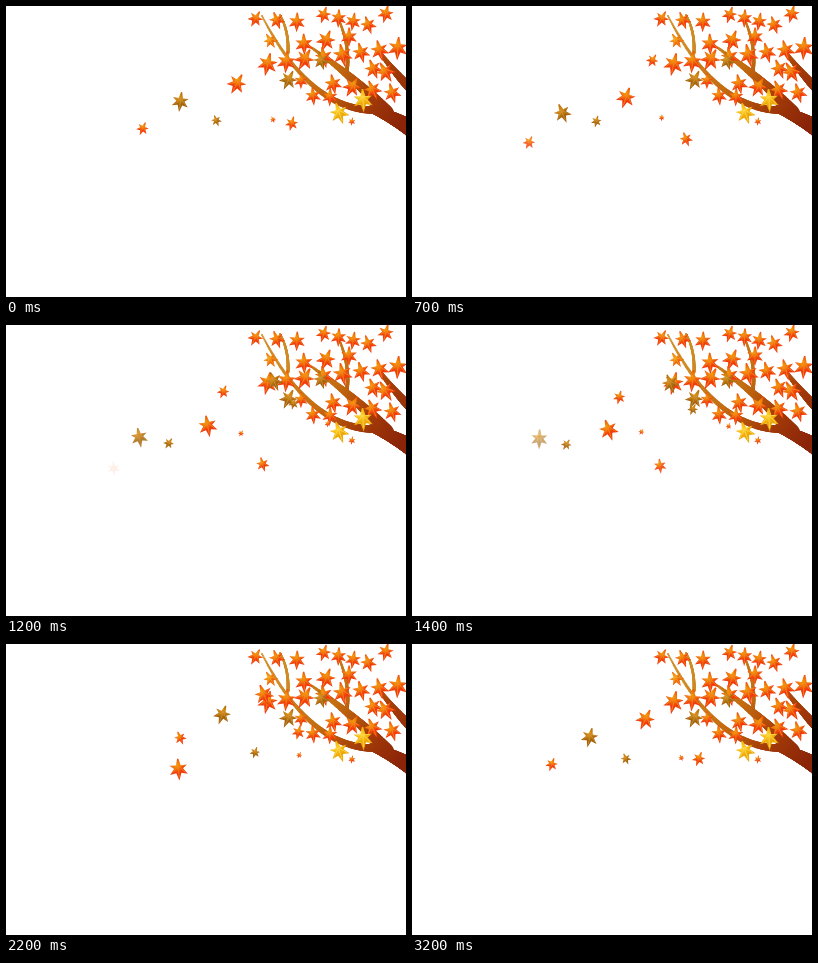
An HTML page with a canvas for the animation above (3300 ms loop, 400x291 px).

```html
<!DOCTYPE html>
<html lang="en">
<head>
<meta charset="utf-8">
<title>Autumn branch</title>
<style>
html, body { margin: 0; width: 100%; height: 100%; overflow: hidden; background: #fff; }
canvas { display: block; width: 400px; height: 291px; }
</style>
</head>
<body>
<canvas id="stage" width="400" height="291"></canvas>
<script>
const ctx = document.getElementById('stage').getContext('2d');
const LOOP = 3300, STEP = 100, FADE = 650, RAD = Math.PI / 180;
const mix = (a, b, p) => a + (b - a) * p;

let seed = 7;
const random = () => (seed = seed * 16807 % 2147483647) / 2147483647;

// Maple leaf, tip up: lobes and notches alternate around the centre, shrinking to the stem.
const leafPath = new Path2D(), veins = new Path2D();
for (let i = -5; i <= 5; i++) {
  const n = Math.abs(i), lobe = n % 2 === 0;
  const r = lobe ? 1.15 - n * .08 : .56 - n * .05;
  const x = r * Math.sin(i * 27 * RAD), y = -r * Math.cos(i * 27 * RAD);
  leafPath.lineTo(x, y);
  if (lobe) {
    veins.moveTo(0, .2);
    veins.lineTo(x * .75, y * .75);
  }
}
leafPath.lineTo(.06, .85);
leafPath.lineTo(-.06, .85);
leafPath.closePath();

const palette = {
  red: ['#f29a08', '#f03c0c', '#f58a1c'],
  orange: ['#f5a410', '#ec6408', '#f7a830'],
  brown: ['#dc9210', '#a4640c', '#d0903c'],
  yellow: ['#ffce24', '#eca808', '#ffd850']
};

function leaf(x, y, r, deg, tone, alpha = 1) {
  const [core, edge, vein] = palette[tone];
  const fill = ctx.createRadialGradient(.15, .25, .1, .15, .25, .95);
  fill.addColorStop(0, core);
  fill.addColorStop(.7, edge);
  ctx.save();
  ctx.globalAlpha = alpha;
  ctx.translate(x, y);
  ctx.rotate(deg * RAD);
  ctx.scale(r, r);
  ctx.fillStyle = fill;
  ctx.fill(leafPath);
  ctx.strokeStyle = vein;
  ctx.lineWidth = .07;
  ctx.stroke(veins);
  ctx.restore();
}

// Leaves stand evenly along each row, with a random tilt and size.
const leaves = [];
function row(tone, r, count, [x0, y0], [x1, y1] = [x0, y0]) {
  for (let i = 0; i < count; i++) {
    const p = i / Math.max(1, count - 1);
    leaves.push([mix(x0, x1, p), mix(y0, y1, p), r * mix(.92, 1.08, random()),
      180 + mix(-35, 35, random()), tone]);
  }
}
row('red', 9.5, 3, [250, 12], [291, 15]);
row('red', 9, 4, [318, 8], [362, 18]);
row('red', 9.5, 1, [380, 7]);
row('orange', 8, 1, [264, 34]);
row('red', 10.5, 3, [298, 37], [343, 30]);
row('red', 11, 8, [262, 57], [392, 41]);
row('brown', 10, 2, [283, 73], [315, 54]);
row('red', 8, 1, [295, 74]);
row('red', 10.5, 2, [367, 62], [379, 65]);
row('red', 10.5, 4, [327, 77], [386, 86]);
row('red', 9.5, 2, [307, 89], [324, 90]);
row('yellow', 11, 2, [333, 106], [357, 93]);
row('red', 4, 1, [346, 115]);

const bark = ctx.createLinearGradient(396, 118, 285, 25);
bark.addColorStop(0, '#8a2408');
bark.addColorStop(.3, '#a43c08');
bark.addColorStop(.6, '#c46c10');
bark.addColorStop(1, '#d08c24');

// A quadratic curve drawn as overlapping discs that taper to the end.
function branch([x0, y0], [cx, cy], [x1, y1], thick, thin) {
  ctx.fillStyle = bark;
  for (let p = 0; p <= 1; p += 1 / 120) {
    ctx.beginPath();
    ctx.arc(mix(mix(x0, cx, p), mix(cx, x1, p), p),
      mix(mix(y0, cy, p), mix(cy, y1, p), p), mix(thick, thin, p) / 2, 0, 7);
    ctx.fill();
  }
}

function drawTree() {
  branch([404, 82], [388, 66], [372, 44], 9, 3);
  branch([340, 68], [346, 44], [331, 9], 4, 2);
  branch([282, 47], [283, 25], [274, 9], 3, 2);
  branch([372, 104], [306, 107], [256, 10], 8, 2);
  branch([381, 107], [349, 71], [303, 40], 14, 2);
  branch([406, 123], [385, 110], [366, 103], 17, 8);
  leaves.forEach(args => leaf(...args));
}

// Each leaf drifts through evenly timed points from start to end.
const falling = [
  { tone: 'red', r: 11, start: 1900, end: 6400, path: [[262, 45], [229, 79], [191, 108], [149, 145]] },
  { tone: 'brown', r: 10, start: 800, end: 5050, path: [[282, 52], [216, 70], [163, 101], [120, 115]] },
  { tone: 'brown', r: 6, start: 900, end: 5300, path: [[295, 72], [243, 111], [191, 114], [136, 122]] },
  { tone: 'red', r: 7, start: 400, end: 4550, path: [[250, 49], [190, 82], [141, 119], [107, 143]] },
  { tone: 'red', r: 7.5, start: 1500, end: 5300, path: [[292, 72], [291, 103], [273, 133], [228, 143]] },
  { tone: 'red', r: 3.4, start: 900, end: 5300, path: [[327, 96], [289, 112], [254, 112], [217, 103]] }
];

// Catmull-Rom spline, one coordinate.
function spline(a, b, c, d, p) {
  return b + p / 2 * (c - a + p * (2 * a - 5 * b + 4 * c - d + p * (3 * (b - c) + d - a)));
}

function drawFalling({ tone, r, start, end, path }, t, index) {
  if (t < start || t >= end) return;
  const s = (t - start) / (end - start) * (path.length - 1), i = Math.floor(s);
  const at = n => path[Math.min(path.length - 1, Math.max(0, n))];
  const [x, y] = [0, 1].map(k =>
    spline(at(i - 1)[k], at(i)[k], at(i + 1)[k], at(i + 2)[k], s - i));
  const sway = 185 + 28 * Math.sin(t / 450 + index * 2);
  leaf(x, y, r, sway, tone, Math.min(1, (end - t) / FADE));
}

function draw(now) {
  const t = Math.floor(now % LOOP / STEP) * STEP;
  ctx.clearRect(0, 0, 400, 291);
  drawTree();
  falling.forEach((item, i) => {
    drawFalling(item, t, i);
    drawFalling(item, t + LOOP, i);
  });
}

const begin = performance.now();
function tick() {
  draw(performance.now() - begin);
  requestAnimationFrame(tick);
}
tick();
</script>
</body>
</html>
```
